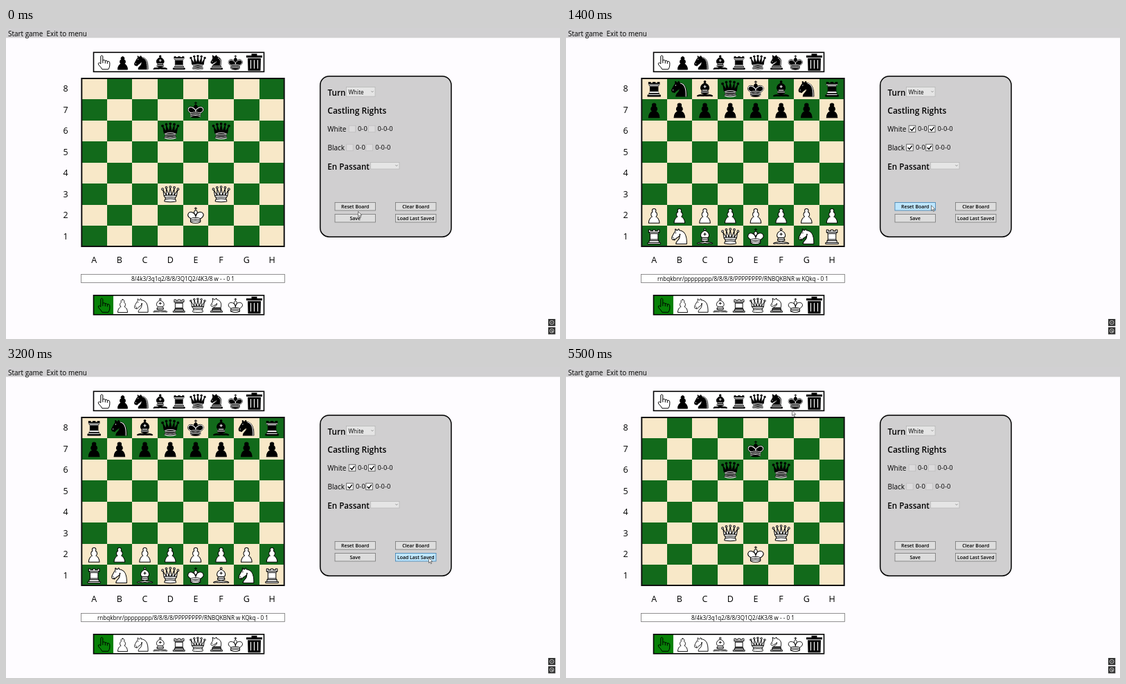
These frames come from a looping animation (800 px wide and 450 px high, 5600 ms). An HTML page:

```html
<!DOCTYPE html>
<html lang="en">
<head>
<meta charset="utf-8">
<title>Chess board editor</title>
<style>
  html, body { margin: 0; width: 100%; height: 100%; overflow: hidden; background: #fefcff; }
  svg { display: block; width: 100vw; height: 100vh; font-family: "Open Sans", "Noto Sans", sans-serif; }
  .bold { font-weight: 600; }
  .mid { text-anchor: middle; }
  .button rect { fill: #ddd; stroke: #777; }
  .button.hover rect { fill: #bee6fd; stroke: #3c7fb1; }
</style>
</head>
<body>
<svg id="stage" viewBox="0 0 800 450"></svg>
<script>
const LOOP = 5600;
const RESET_AT = 1000, LOAD_AT = 3800;
const BOARD = { x: 108.8, y: 72.5, w: 36.7, h: 30.5 };
const SAVED = '8/4k3/3q1q2/8/8/3Q1Q2/4K3/8 w - - 0 1';
const INITIAL = 'rnbqkbnr/pppppppp/8/8/8/8/PPPPPPPP/RNBQKBNR w KQkq - 0 1';

// Piece outlines on a 45 x 45 grid; "lines" is the inner detail, "dark" its version on black pieces.
const ball = (x, y) => `M${x - 2} ${y}a2 2 0 1 1 4 0a2 2 0 1 1-4 0z`;
const PIECES = {
  p: { body: 'M22.5 9c-2.2 0-4 1.8-4 4 0 .9.3 1.7.8 2.4C17.3 16.5 16 18.6 16 21c0 2 .9 3.8 2.4 5-3 1.1-7.4 5.6-7.4 13.5h23c0-7.9-4.4-12.4-7.4-13.5 1.5-1.2 2.4-3 2.4-5 0-2.4-1.3-4.5-3.3-5.6.5-.7.8-1.5.8-2.4 0-2.2-1.8-4-4-4z' },
  n: {
    body: 'M22 10C32.5 11 38.5 18 38 39H15C15 30 25 32.5 23 18M24 18C24.4 20.9 18.5 25.4 16 27 13 29 13.2 31.3 11 31 10 30 12.4 28 11 28 10 28 11.2 29.2 10 30 9 30 6 31 6 26 6 24 12 14 12 14S13.9 12.1 14 10.5C13.3 9.5 13.5 8.5 13.5 7.5 14.5 6.5 16.5 10 16.5 10H18.5S19.3 8 21 7C22 7 22 10 22 10',
    lines: 'M9 25.2v.5M14.7 15l-.5 1',
    dark: 'M9 25.2v.5M14.7 15l-.5 1M24.8 11.2C32 12.5 37 19 36.3 39'
  },
  b: {
    body: 'M9 36c3.4-1 10.1.4 13.5-2 3.4 2.4 10.1 1 13.5 2 0 0 1.6.5 3 2-.7 1-1.6 1-3 .5-3.4-1-10.1.5-13.5-1-3.4 1.5-10.1 0-13.5 1-1.4.5-2.3.5-3-.5 1.4-1.9 3-2 3-2zM15 32c2.5 2.5 12.5 2.5 15 0 .5-1.5 0-2 0-2 0-2.5-2.5-4-2.5-4 5.5-1.5 6-11.5-5-15.5-11 4-10.5 14-5 15.5 0 0-2.5 1.5-2.5 4 0 0-.5.5 0 2z' + ball(22.5, 8),
    lines: 'M17.5 26h10M15 30h15M22.5 15.5v5M20 18h5'
  },
  r: {
    body: 'M9 39h27v-3H9zM12 36v-4h21v4zM14 29.5l-1.5 2.5h20l-1.5-2.5zM14 17h17v12.5H14zM11 14V9h4v2h5V9h5v2h5V9h4v5l-3 3H14z',
    lines: 'M11 14h23',
    dark: 'M12 35.5h21M13 31.5h19M14 29.5h17M14 16.5h17M11 14h23'
  },
  q: {
    body: 'M9 26c8.5-1.5 21-1.5 27 0l2-12-7 11V11l-5.5 13.5-3-15-3 15-5.5-14V25L7 14zM9 26c0 2 1.5 2 2.5 4 1 1.5 1 1 .5 3.5-1.5 1-1.5 2.5-1.5 2.5-1.5 1.5.5 2.5.5 2.5 6.5 1 16.5 1 23 0 0 0 1.5-1 0-2.5 0 0 .5-1.5-1-2.5-.5-2.5-.5-2 .5-3.5 1-2 2.5-2 2.5-4-8.5-1.5-18.5-1.5-27 0z'
      + ball(6, 12) + ball(14, 8.5) + ball(22.5, 7.5) + ball(31, 8.5) + ball(39, 12),
    lines: 'M11.5 30c3.5-1 18.5-1 22 0M12 33.5c6-1 15-1 21 0',
    dark: 'M11 29a35 35 0 0 1 23 0M12.5 31.5h20M11.5 34.5a35 35 0 0 0 22 0M10.5 37.5a35 35 0 0 0 24 0'
  },
  k: {
    body: 'M22.5 11.6V6M20 8h5M22.5 25s4.5-7.5 3-10.5c0 0-1-2.5-3-2.5s-3 2.5-3 2.5c-1.5 3 3 10.5 3 10.5M11.5 37c5.5 3.5 15.5 3.5 21 0v-7s9-4.5 6-10.5c-4-6.5-13.5-3.5-16 4V27v-3.5c-3.5-7.5-13-10.5-16-4-3 6 5 10 5 10z',
    lines: 'M11.5 30c5.5-3 15.5-3 21 0m-21 3.5c5.5-3 15.5-3 21 0m-21 3.5c5.5-3 15.5-3 21 0',
    dark: 'M32 29.5s8.5-4 6-9.6C34.2 14 25 18 22.5 24.5v2.1-2.1C20 18 9.9 14 7 19.9c-2.5 5.6 4.9 9 4.9 9M11.5 30c5.5-3 15.5-3 21 0m-21 3.5c5.5-3 15.5-3 21 0m-21 3.5c5.5-3 15.5-3 21 0'
  },
  // Rook and knight combined
  c: {
    body: 'M9 39h27v-3H9zM12 36v-4h21v4zM13.5 29l-1.5 3h21l-1.5-3zM23 9C32 11 35 18 32 29H15C15 25 24 25 23 18 21 22 17 22 15 24 12 27 8 25 9 21 11 18 13 15 13.5 12L12.5 6 18 9.5C19 7.5 20 6.5 21.5 6z',
    lines: 'M12.5 20.5v.5M12 32h21',
    dark: 'M12.5 20.5v.5M12 35.5h21M13 31.5h19M26 12C32 15 33 21 31 28'
  }
};

const rect = (x, y, w, h, fill, stroke = 'none', extra = '') =>
  `<rect x="${x}" y="${y}" width="${w}" height="${h}" fill="${fill}" stroke="${stroke}" ${extra}/>`;
const text = (x, y, size, content, cls = '') =>
  `<text x="${x}" y="${y}" font-size="${size}" class="${cls}">${content}</text>`;
const path = (d, attrs) => `<path d="${d}" ${attrs}/>`;

function piece(letter, x, y, scale) {
  const isBlack = letter === letter.toLowerCase();
  const { body, lines = '', dark = lines } = PIECES[letter.toLowerCase()];
  return `<g transform="translate(${x} ${y}) scale(${scale})" stroke-width="1.5" stroke-linejoin="round" stroke-linecap="round">`
    + path(body, `fill="${isBlack ? '#000' : '#fff'}" stroke="#000"`)
    + path(isBlack ? dark : lines, `fill="none" stroke="${isBlack ? '#fff' : '#000'}"`) + '</g>';
}

function hand(x, y, fill) {
  return `<g transform="translate(${x} ${y})" stroke="#000" stroke-linejoin="round">`
    + path('M-4.5 2V-9Q-3-11.500-1.500-9V-3Q.5-4.500 2-2.500 4-3.500 5-1.500 8-2.500 8.500.5V4Q8.500 7 6.500 10H-2.500Q-4 7-7.500 3.500-9 1-7 .5-6 .5-4.500 2z', `fill="${fill}"`)
    + path('M-1.500-3V1M2-2.500V1.500M5-1.500V2', 'fill="none"') + '</g>';
}

const trash = (x, y) => `<g transform="translate(${x} ${y})">`
  + path('M-11.500-9.500H-4V-12H4V-9.500H11.500V-6.500H-11.500zM-9.500-5.500H9.500L9 12.500H-9z', 'fill="#000"')
  + path('M-5-3V9.500M0-3V9.500M5-3V9.500', 'stroke="#fff" stroke-width="1.2"') + '</g>';

function toolbar(y, letters, active) {
  const slot = i => 141.3 + 27.15 * i;
  return rect(126.5, y, 246, 28, '#fff')
    + (active ? rect(127, y, 28, 28, '#078207') : '')
    + hand(slot(0), y + 14.5, active ? '#078207' : '#fff')
    + [...letters].map((l, i) => piece(l, slot(i + 1) - 13.7, y + 0.7, 0.61)).join('')
    + trash(slot(8), y + 14)
    + rect(126.5, y, 246, 28, 'none', '#000', 'stroke-width="1.6"');
}

function board() {
  let out = '';
  for (let i = 0; i < 64; i++) {
    const col = i % 8, row = i >> 3;
    out += rect(BOARD.x + col * BOARD.w, BOARD.y + row * BOARD.h, BOARD.w, BOARD.h,
      (col + row) % 2 ? '#126a1b' : '#f8e8c8', 'none', 'shape-rendering="crispEdges"');
  }
  out += rect(109.3, 73, 292.4, 243, 'none', '#111', 'stroke-width="2"');
  for (let i = 0; i < 8; i++) {
    out += text(86, 92.4 + i * BOARD.h, 12.5, 8 - i, 'mid')
      + text(127.1 + i * BOARD.w, 339.7, 12.5, 'ABCDEFGH'[i], 'mid');
  }
  return out + rect(108.5, 356.5, 294, 12, '#fff', '#777', 'stroke-width=".8"');
}

function combo(x, y, w, h, label) {
  return rect(x, y, w, h, '#e5e5e5', '#b4b4b4', 'stroke-width=".7"')
    + text(x + 3, y + 10.7, 8.2, label)
    + path(`M${x + w - 5.500} ${y + h / 2 - 1}l1.500 1.500 1.500-1.500`, 'fill="none" stroke="#777" stroke-width=".8"');
}

const button = (id, x, y, label) => `<g id="${id}" class="button">`
  + rect(x, y, 58.5, 11.5, '', '', 'stroke-width=".8"')
  + text(x + 29.25, y + 8.4, 6.95, label, 'bold mid') + '</g>';

const BUTTONS = [
  ['reset', 475, 252.5, 'Reset Board'], ['clear', 562.5, 252.5, 'Clear Board'],
  ['save', 475, 269.5, 'Save'], ['load', 562.5, 269.5, 'Load Last Saved']
];

function panel() {
  return rect(453.7, 69.7, 189.3, 232.5, '#d0cfd0', '#000', 'rx="13" stroke-width="1.5"')
    + text(464.5, 97.5, 11.7, 'Turn', 'bold') + combo(491.5, 85.5, 41.5, 13.5, 'White')
    + text(464.3, 124.3, 12, 'Castling Rights', 'bold')
    + text(464.3, 150, 10, 'White') + text(464.5, 177, 10, 'Black')
    + text(508, 149.4, 9.4, '0-0') + text(536.5, 149.4, 9.4, '0-0-0')
    + text(505, 176.4, 9.4, '0-0') + text(533.2, 176.4, 9.4, '0-0-0')
    + text(464.3, 204.6, 11.6, 'En Passant', 'bold') + combo(526.5, 194.5, 41.5, 9.5, '')
    + BUTTONS.map(b => button(...b)).join('');
}

const checkbox = (x, y, on) => on
  ? rect(x, y, 9.5, 9.5, '#fff', '#555', 'stroke-width=".9"')
    + path(`M${x + 2} ${y + 4.7}l2.300 2.500 3.700-5`, 'fill="none" stroke="#000" stroke-width="1.500"')
  : rect(x, y, 9.5, 9.5, '#dcdbdc', '#bebdbe', 'stroke-width=".8"');

function position(id, fen) {
  const [rows, , castling] = fen.split(' ');
  let out = '';
  rows.split('/').forEach((line, row) => {
    let col = 0;
    for (const ch of line) {
      if (ch > '0' && ch < '9') { col += +ch; continue; }
      out += piece(ch, BOARD.x + (col + 0.5) * BOARD.w - 15.25, BOARD.y + row * BOARD.h, BOARD.h / 45);
      col++;
    }
  });
  const boxes = { K: [495.2, 141.2], Q: [523.5, 141.2], k: [491.7, 168.2], q: [519.8, 168.2] };
  for (const side in boxes) out += checkbox(...boxes[side], castling.includes(side));
  return `<g id="${id}">${out}${text(255.4, 365.6, 8.12, fen, 'mid')}</g>`;
}

const cornerIcon = (y, mark) => rect(783, y, 10.3, 10.3, '#333')
  + `<circle cx="788.1" cy="${y + 5.1}" r="2.9" fill="none" stroke="#ddd" stroke-width=".8"/>`
  + path(mark, `transform="translate(788.1 ${y + 5.1})" fill="none" stroke="#ddd" stroke-width="1"`);

const stage = document.getElementById('stage');
stage.innerHTML = rect(0, 0, 800, 450, '#fefcff') + rect(0, 0, 800, 14.3, '#d1d0d2')
  + text(3, 11.7, 9.95, 'Start game') + text(58.5, 11.7, 9.95, 'Exit to menu')
  + toolbar(35.3, 'pnbrqck', false) + toolbar(386.8, 'PNBRQCK', true)
  + board() + panel() + position('saved', SAVED) + position('initial', INITIAL)
  + cornerIcon(421, 'M-.8 0h1.600') + cornerIcon(433, 'M-1 0H1V2')
  + path('M0 0V7.500L1.800 6 3 8.700 4.200 8.200 3 5.500H5.300z', 'id="cursor" fill="#fff" stroke="#444" stroke-width=".7"');

// Cursor stops: time, x, y
const CURSOR = [
  [0, 508.5, 265.5], [500, 528.5, 255.7], [1000, 527.5, 256.7], [1850, 527.5, 256.7],
  [2400, 631.7, 169], [2700, 680, 190], [3100, 610.5, 276], [3500, 610.5, 276],
  [4000, 609.2, 279], [4850, 609.2, 279], [5500, 326.5, 63]
];

function cursorAt(t) {
  const i = CURSOR.findIndex(stop => stop[0] > t);
  if (i < 0) return CURSOR[CURSOR.length - 1].slice(1);
  const [t0, x0, y0] = CURSOR[i - 1], [t1, x1, y1] = CURSOR[i];
  const u = (t - t0) / (t1 - t0), ease = u * u * (3 - 2 * u);
  return [x0 + (x1 - x0) * ease, y0 + (y1 - y0) * ease];
}

const byId = id => document.getElementById(id);

function draw(now) {
  const t = Math.floor((now % LOOP) / 100) * 100;
  const [x, y] = cursorAt(t);
  const isInitial = t >= RESET_AT && t < LOAD_AT;
  byId('saved').style.display = isInitial ? 'none' : '';
  byId('initial').style.display = isInitial ? '' : 'none';
  byId('cursor').setAttribute('transform', `translate(${x} ${y})`);
  for (const [id, left, top] of BUTTONS) {
    const inside = x >= left && x <= left + 58.5 && y >= top && y <= top + 11.5;
    byId(id).classList.toggle('hover', inside);
  }
}

const start = performance.now();
function tick() {
  draw(performance.now() - start);
  requestAnimationFrame(tick);
}
tick();
</script>
</body>
</html>
```
